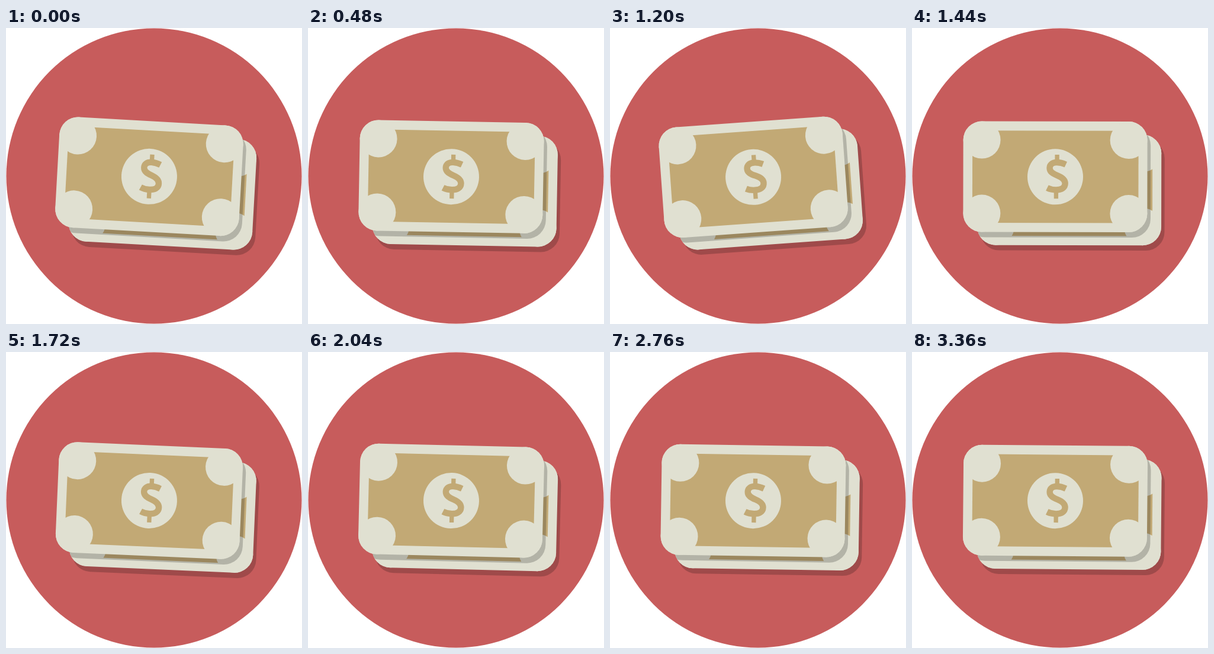
Write an HTML page that moves like this. It is 500x500 px and loops after 3.4 s.

```html
<!DOCTYPE html>
<html lang="en">
<head>
<meta charset="utf-8">
<title>Banknotes</title>
<style>
  html, body { margin: 0; width: 100%; height: 100%; overflow: hidden; background: #fff; }
  svg { display: block; width: 100vw; height: 100vh; }
</style>
</head>
<body>
<svg viewBox="0 0 500 500">
  <defs>
    <rect id="card" x="86.5" y="157.8" width="311" height="187" rx="31.5"/>
    <g id="note">
      <use href="#card" fill="#e0e0d1"/>
      <rect x="102" y="173.6" width="280.5" height="155.6" fill="#c2a975"/>
      <g fill="#e0e0d1">
        <circle cx="118" cy="189.3" r="31.5"/>
        <circle cx="366" cy="189.3" r="31.5"/>
        <circle cx="118" cy="313.3" r="31.5"/>
        <circle cx="366" cy="313.3" r="31.5"/>
      </g>
    </g>
    <clipPath id="backShape">
      <use href="#card" transform="translate(23.7 22.1)"/>
    </clipPath>
  </defs>
  <circle cx="250" cy="250" r="249.5" fill="#c75c5c"/>
  <g id="stack">
    <use href="#card" transform="translate(29.2 31)" opacity=".2"/>
    <use href="#note" transform="translate(23.7 22.1)"/>
    <g clip-path="url(#backShape)">
      <use href="#card" transform="translate(5.6 9)" opacity=".2"/>
    </g>
    <use href="#note"/>
    <circle cx="242" cy="251.3" r="47" fill="#e0e0d1"/>
    <path d="M241.4 214h7.3v12h-7.3zM239.8 275h7.3v13.2h-7.3z" fill="#c2a975"/>
    <path d="M259.8 230.6C254 228 249 227 244.5 227C236.800 227 232.500 231 232.500 236.500C232.500 243 238 246.200 246 249.300C254 252.500 258.700 256 258.700 262.500C258.700 270 252 273.400 243.500 273.400C238 273.400 232.500 272.200 228.400 270.200"
      fill="none" stroke="#c2a975" stroke-width="10.4"/>
  </g>
</svg>
<script>
  const LOOP = 3400, STEP = 40;
  const stack = document.getElementById("stack");

  // Turning points of the swing: [time in ms, angle in degrees]
  const swing = [[-690, -5.55], [160, 4], [1010, -5.55], [1690, 2.5], [2140, 1.22], [3400, 0.5]];

  const ease = p => (1 - Math.cos(Math.PI * p)) / 2;

  function angleAt(t) {
    const i = swing.findIndex(([time]) => time > t);
    const [t0, a0] = swing[i - 1], [t1, a1] = swing[i];
    return a0 + (a1 - a0) * ease((t - t0) / (t1 - t0));
  }

  function draw(now) {
    const t = Math.floor((now % LOOP) / STEP) * STEP;
    stack.setAttribute("transform", `rotate(${angleAt(t).toFixed(3)} 250 250)`);
  }

  let start;
  function tick(now) {
    start ??= now;
    draw(now - start);
    requestAnimationFrame(tick);
  }
  draw(0);
  requestAnimationFrame(tick);
</script>
</body>
</html>
```
